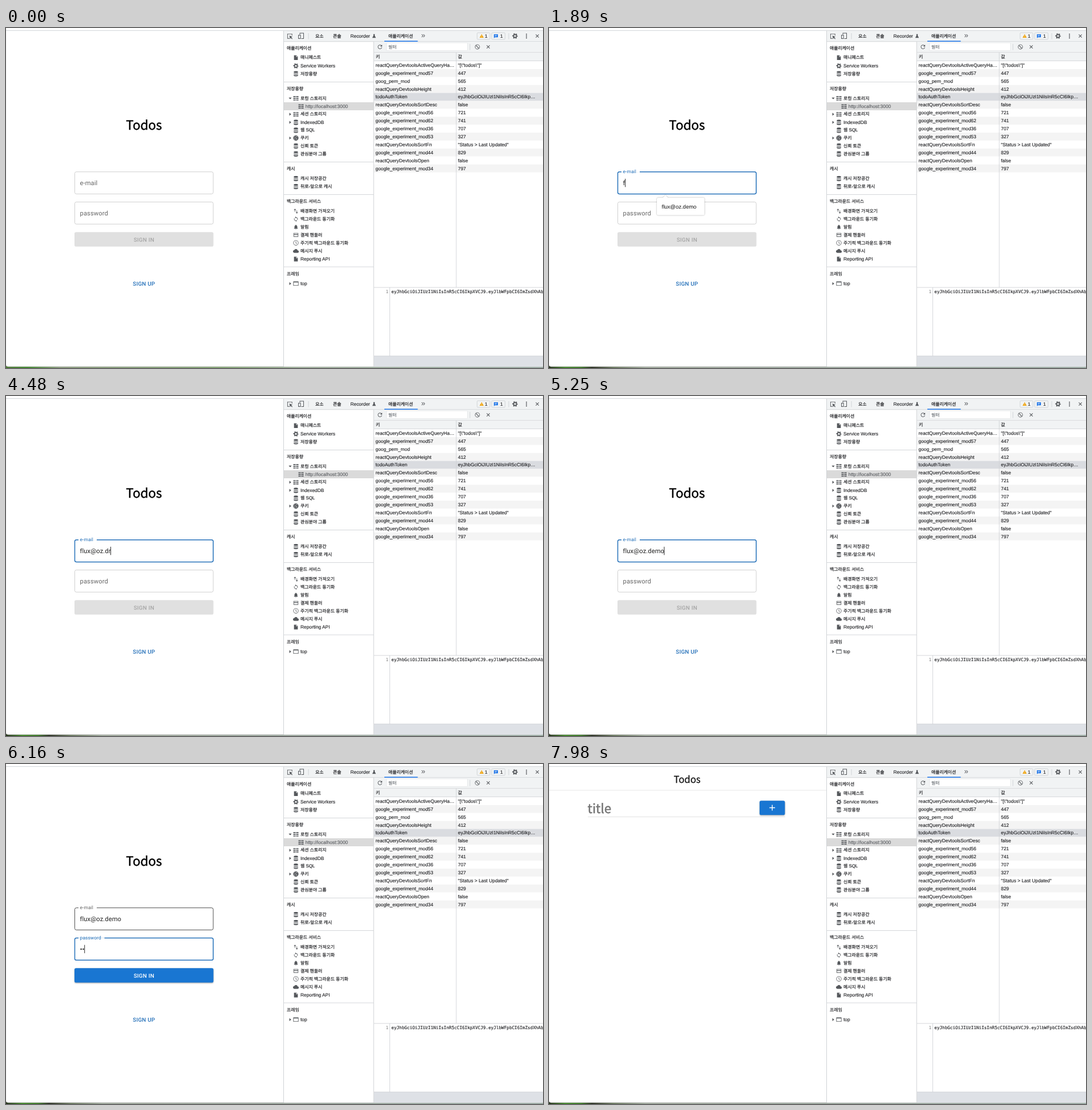
These frames come from a looping animation (941x595 px, 8000 ms). An HTML page:

```html
<!DOCTYPE html>
<html lang="ko">
<head>
<meta charset="utf-8">
<title>Todos</title>
<style>
html, body { margin: 0; width: 100%; height: 100%; overflow: hidden; background: #fff; }
svg { display: block; width: 941px; height: 595px; }
text { font: 8.36px "Liberation Sans", "Noto Sans CJK KR", "Noto Sans CJK JP", sans-serif; fill: #202124;
  text-rendering: geometricPrecision; white-space: pre; }
.panel { stroke-width: .14px; }
.ko { font-size: 7.85px; stroke-width: .2px; }
.noto { font-family: "Noto Sans CJK KR", "Noto Sans CJK JP", "Noto Sans", sans-serif; }
.mono { font: 7.63px "DejaVu Sans Mono", monospace; }
.field { font: 11.14px Roboto, sans-serif; letter-spacing: .1px; }
.button { font: 500 9.74px Roboto, sans-serif; letter-spacing: .28px; }
.mid { text-anchor: middle; }
</style>
</head>
<body>
<svg viewBox="0 0 941 595">
  <defs>
    <linearGradient id="early">
      <stop offset="0" stop-color="#4d7a35"/><stop offset=".04" stop-color="#3f8a2c"/>
      <stop offset=".1" stop-color="#8f9f83"/><stop offset=".4" stop-color="#87a878"/>
      <stop offset=".55" stop-color="#a3b3a0"/><stop offset="1" stop-color="#9fafa8"/>
    </linearGradient>
    <linearGradient id="late">
      <stop offset="0" stop-color="#26331c"/><stop offset=".03" stop-color="#43882b"/>
      <stop offset=".06" stop-color="#3c7a28"/><stop offset=".08" stop-color="#2b3022"/>
      <stop offset=".12" stop-color="#6d7c62"/><stop offset=".18" stop-color="#a3ada0"/>
      <stop offset="1" stop-color="#9fafa8"/>
    </linearGradient>
  </defs>
  <rect id="desk" width="941" height="595"/>
  <rect x="-.3" y="-10" width="941.6" height="602.7" rx="4" fill="#fff" stroke="#aaa" stroke-width=".6"/>
  <g id="page"></g>
  <g id="tools"></g>
</svg>
<script>
const $ = id => document.getElementById(id);
const rect = (x, y, w, h, fill, more = '') =>
  `<rect x="${x}" y="${y}" width="${w}" height="${h}" fill="${fill}" ${more}/>`;
const text = (x, y, s, cls = '', style = '') =>
  `<text x="${x}" y="${y}" class="${cls}" style="${style}">${s}</text>`;
// Small panel label, centred vertically on y
const label = (x, y, s, fill = '#202124') =>
  text(x, y + 2.8, s, /[가-힣]/.test(s) ? 'panel ko' : 'panel', `fill:${fill};stroke:${fill}`);

const shapes = {
  file: 'M6 2h8l6 6v14H4V2zM13 9h5.5L13 3.5z',
  db: 'M3 4c0-4 18-4 18 0v2c0 4-18 4-18 0zM3 9c0 4 18 4 18 0v3c0 4-18 4-18 0zM3 15c0 4 18 4 18 0v5c0 4-18 4-18 0z',
  grid: 'M1 3h10v4H1zM13 3h10v4H13zM1 10h10v4H1zM13 10h10v4H13zM1 17h10v4H1zM13 17h10v4H13z',
  cookie: 'M12 1a11 11 0 100 22 11 11 0 000-22zM7 7h3v3H7zM14 5h3v3h-3zM13 14h4v3h-4zM6 14h3v3H6z',
  swap: 'M8 2 3 7h4v8h2V7h4zM17 17V9h-2v8h-4l5 5 5-5z',
  sync: 'M12 4V1L8 5l4 4V6c3.3 0 6 2.7 6 6 0 1-.25 2-.7 2.8l1.46 1.46A7.9 7.9 0 0020 12c0-4.4-3.6-8-8-8zm0 14c-3.3 0-6-2.7-6-6 0-1 .25-2 .7-2.8L5.24 7.74A7.9 7.9 0 004 12c0 4.4 3.6 8 8 8v3l4-4-4-4z',
  bell: 'M12 22a2 2 0 002-2h-4a2 2 0 002 2zm6-6v-5c0-3-1.6-5.6-4.5-6.3V4a1.5 1.5 0 00-3 0v.7C7.6 5.4 6 7.9 6 11v5l-2 2v1h16v-1z',
  card: 'M2 4h20v16H2zM4 6v3h16V6zM4 12v6h16v-6z',
  clock: 'M12 1a11 11 0 100 22 11 11 0 000-22zm0 2a9 9 0 110 18 9 9 0 010-18zM11 6h2v6l4 2.5-1 1.5-5-3z',
  cloud: 'M19.35 10A7.5 7.5 0 005.35 8 6 6 0 006 20h13a5 5 0 00.35-10z',
  frame: 'M1 3h22v18H1zM3 7v12h18V7z',
  pick: 'M2 2h19v8h-2V4H4v15h7v2H2zM10 9l12 5-5 2 5 5-2 2-5-5-2 5z',
  device: 'M7 1h15v21h-9v-2h7V3H9v4H7zM2 8h9v14H2zM4 10v10h5V10z',
  flask: 'M8 3h8v2h-1v5l6 11H3l6-11V5H8z',
  warn: 'M12 2 1 21h22zM11 9h2v6h-2zM11 17h2v2h-2z',
  note: 'M2 3h20v15H7l-5 4zM6 7h12v2H6zM6 11h9v2H6z',
  reload: 'M17.65 6.35A8 8 0 1019.7 14h-2.1A6 6 0 1116.2 7.8L13 11h7V4z',
  block: 'M12 2a10 10 0 100 20 10 10 0 000-20zm0 2a8 8 0 110 16 8 8 0 010-16zM5 7l2-2 12 12-2 2z',
  close: 'M4 6l2-2 6 6 6-6 2 2-6 6 6 6-2 2-6-6-6 6-2-2 6-6z',
  dots: 'M10 3h4v4h-4zM10 10h4v4h-4zM10 17h4v4h-4z',
  open: 'M3 7h18l-9 11z',
  shut: 'M7 3v18l11-9z'
};
function icon(name, x, y, size = 10, fill = '#55585c') {
  const at = `transform="translate(${x} ${y}) scale(${size / 24}) translate(-12 -12)"`;
  if (name === 'gear') return `<g ${at} fill="none" stroke="${fill}"><circle cx="12" cy="12" r="6" stroke-width="4"/>
    <circle cx="12" cy="12" r="9" stroke-width="4" stroke-dasharray="4.71" stroke-dashoffset="2.3"/></g>`;
  return `<path ${at} fill="${fill}" fill-rule="evenodd" d="${shapes[name]}"/>`;
}

const LINE = '#cacdd1', BAR = '#f1f3f4', BOTTOM = 592.5;
const rule = (x, y, w, h) => rect(x, y, w, h, LINE);

function sidebar() {
  const heads = [['애플리케이션', 35], ['저장용량', 106], ['캐시', 246], ['백그라운드 서비스', 303], ['프레임', 430]];
  const items = [
    ['file', '매니페스트', 51.5], ['gear', 'Service Workers', 66], ['db', '저장용량', 79.7],
    ['grid', '로컬 스토리지', 122.8, 'open'], ['grid', '세션 스토리지', 150.6, 'shut'],
    ['db', 'IndexedDB', 164.8, 'shut'], ['db', '웹 SQL', 178.6], ['cookie', '쿠키', 192.3, 'shut'],
    ['db', '신뢰 토큰', 206.2], ['db', '관심분야 그룹', 220],
    ['db', '캐시 저장공간', 263.2], ['db', '뒤로-앞으로 캐시', 277.2],
    ['swap', '배경화면 가져오기', 320.2], ['sync', '백그라운드 동기화', 334.1], ['bell', '알림', 348],
    ['card', '결제 핸들러', 361.8], ['clock', '주기적 백그라운드 동기화', 375.8],
    ['cloud', '메시지 푸시', 389.8], ['file', 'Reporting API', 404], ['frame', 'top', 447, 'shut']
  ];
  return rect(487, 130, 157, 14, '#dadada') + icon('grid', 517, 137.2) +
    label(524.5, 137, 'http://localhost:3000', '#5a5d61') +
    [94, 234, 291, 417.6].map(y => rule(487, y, 157, .8)).join('') +
    heads.map(([s, y]) => label(492, y, s)).join('') +
    items.map(([pic, s, y, arrow]) => icon(pic, 508, y + .3) + label(516, y, s) +
      (arrow ? icon(arrow, 498, y + .3, 7) : '')).join('');
}

function table() {
  const rows = [
    ['reactQueryDevtoolsActiveQueryHa…', '"[\\"todos\\"]"'], ['google_experiment_mod57', 447],
    ['goog_pem_mod', 565], ['reactQueryDevtoolsHeight', 412],
    ['todoAuthToken', 'eyJhbGciOiJIUzI1NiIsInR5cCI6Ikp…'], ['reactQueryDevtoolsSortDesc', 'false'],
    ['google_experiment_mod56', 721], ['google_experiment_mod62', 741],
    ['google_experiment_mod36', 707], ['google_experiment_mod53', 327],
    ['reactQueryDevtoolsSortFn', '"Status &gt; Last Updated"'], ['google_experiment_mod44', 829],
    ['reactQueryDevtoolsOpen', 'false'], ['google_experiment_mod34', 797]
  ];
  return rect(645, 43, 296, 14.5, BAR) + rule(645, 42.4, 296, .7) + rule(645, 57.2, 296, .7) +
    label(648, 50, '키') + label(792, 50, '값') +
    rows.map(([key, value], i) => {
      const y = 65 + i * 13.9;
      return rect(645, y - 7, 296, 13.9, i === 4 ? '#dadce0' : i % 2 ? '#f4f4f4' : '#fff') +
        label(647.5, y, key) + label(792, y, value);
    }).join('') + rule(788.6, 43, .8, 411);
}

function toolbar() {
  const badge = (x, w) => rect(x, 8.3, w, 11.6, BAR, `rx="1.5" stroke="${LINE}" stroke-width=".8"`);
  return rect(487, 5, 454, 19, BAR) + rule(487, 23.4, 454, .8) +
    icon('pick', 497.5, 14.5, 11) + icon('device', 517, 14, 12) + rule(529.6, 9, .8, 10.5) +
    label(542, 14, '요소') + label(573, 14, '콘솔') + label(603.5, 14, 'Recorder') +
    icon('flask', 645, 14, 8.5) + label(670, 14, '애플리케이션') +
    rect(663, 22.4, 58.5, 1.5, '#1a73e8') + text(727.5, 17.3, '»', '', 'font-size:13px;fill:#55585c') +
    badge(825.5, 22.5) + icon('warn', 833.5, 14, 8, '#f0a30a') + label(839, 14, '1') +
    badge(851, 23.5) + icon('note', 858.5, 14.2, 8.5, '#1a73e8') + label(866, 14, '1') +
    rule(880.6, 9, .8, 10.5) + icon('gear', 892, 14, 10.5) + icon('dots', 912, 14, 11) + icon('close', 931, 14, 9) +
    rect(645, 24.2, 296, 18.3, BAR) + icon('reload', 655.3, 33, 11.5) +
    rect(667, 26, 141.5, 13.5, '#fff', 'stroke="#dfe1e4" stroke-width=".6"') + label(670, 32.8, '필터', '#70757a') +
    rule(812.6, 28, .8, 10.5) + icon('block', 826, 33, 10.5) + icon('close', 845, 33, 9);
}

const token = 'eyJhbGciOiJIUzI1NiIsInR5cCI6IkpXVCJ9.eyJlbWFpbCI6ImZsdXhAb';
$('tools').innerHTML =
  rule(0, 4, 941, .8) + rect(487, 5, 454, BOTTOM - 5, '#fff') + toolbar() + sidebar() + table() +
  rule(645, 453.6, 296, .8) + rule(672, 454, .8, 120) +
  text(670, 464.3, '1', 'mono', 'text-anchor:end;fill:#777') +
  text(675.3, 464.3, token, 'mono panel', 'stroke:#202124') +
  rect(645, 574, 296, BOTTOM - 574, '#dee1e6') + rule(645, 573.6, 296, .8) +
  rule(486, 5, .9, BOTTOM - 5) + rule(643.8, 24, .9, BOTTOM - 24);

const LOOP = 8000, BLUE = '#2470b9';
const EMAIL = 'flux@oz.demo', TYPO = EMAIL.slice(0, 9) + 'r';
const FOCUS = 1540, NEXT = 5390, FILLED = 5810, LEAVE = 6860, HOVER = 7420, ENTER = 7770;
const typing = [[1820, 1], [1960, 2], [2240, 4], [3150, 5], [3640, 6], [3850, 7], [4060, 8],
  [4340, 9], [4900, 9], [5040, 10], [5110, 11], [5180, 12]];
const dotTimes = [5810, 6020, 6230, 6370, 6650, 6860, 7140, 7350];

const pen = document.createElement('canvas').getContext('2d');
pen.font = '11.14px Roboto, sans-serif';
const between = (t, a, b) => t >= a && t < b;
const mix = (a, b, p) => a + (b - a) * p;
const blend = (a, b, p) => `rgb(${a.map((v, i) => Math.round(mix(v, b[i], p)))})`;

// CSS cubic-bezier(x1, 0, .2, 1), solved by bisection
function ease(x, x1) {
  if (x <= 0 || x >= 1) return x <= 0 ? 0 : 1;
  let lo = 0, hi = 1, s;
  for (let i = 0; i < 20; i++) {
    s = (lo + hi) / 2;
    const r = 1 - s;
    if (3 * s * r * r * x1 + .6 * s * s * r + s ** 3 < x) lo = s; else hi = s;
  }
  return s * s * (3 - 2 * s);
}

function field(y, name, gap, raised, focused, hovered) {
  const line = focused ? BLUE : hovered ? '#222' : '#c4c4c4';
  const size = mix(11.14, 8.36, raised);
  return rect(120.5, y, 242.6, 38.7, '#fff', `rx="2.8" stroke="${line}" stroke-width="${focused ? 1.5 : .8}"`) +
    (raised ? rect(127, y - 1, gap * raised, 2.2, '#fff') : '') +
    text(129.6, mix(y + 23.3, y + 2.7, raised), name, 'field', `font-size:${size}px;fill:${focused ? BLUE : '#666'}`);
}
const caret = (x, y) => rect(x, y, .9, 14.5, '#111');
const raisedButton = (x, y, w, h, fill, shade) =>
  rect(x, y, w, h, fill, `rx="2.8" style="filter:drop-shadow(0 1px 1px rgba(0,0,0,${.35 * shade}))"`);

function popup() {
  const shadow = 'style="filter:drop-shadow(0 .7px 1.3px rgba(0,0,0,.35))"';
  return `<g ${shadow}>${rect(189, 297, 83.5, 30.5, '#fff', 'rx="2.5"')}
    <path d="M199 297.5l5-5 5 5z" fill="#fff"/></g>` +
    text(197.5, 315.8, EMAIL, '', 'font-size:9.5px;fill:#111');
}

function signIn(t) {
  const step = typing.filter(([at]) => at <= t).pop();
  const typed = between(t, 4480, 4900) ? TYPO : EMAIL.slice(0, step ? step[1] : 0);
  const dots = dotTimes.filter(at => at <= t).length;
  const onEmail = between(t, FOCUS, NEXT), onPassword = t >= NEXT;
  const on = ease((t - FILLED) / 250, .4), dark = ease((t - HOVER) / 250, .4);
  const fill = dark ? blend([25, 118, 210], [21, 101, 192], dark) : blend([224, 224, 224], [25, 118, 210], on);
  const alpha = mix(.26, 1, on), tone = Math.round(255 * on / alpha);

  let out = text(241.7, 178.4, 'Todos', 'noto mid', 'font-size:22.3px;fill:#000;stroke:#000;stroke-width:.45px') +
    field(251.7, 'e-mail', 32, ease((t - FOCUS) / 200, 0), onEmail, between(t, NEXT, LEAVE)) +
    field(304.5, 'password', 45.5, ease((t - NEXT) / 200, 0), onPassword, false) +
    text(129.6, 275.4, typed, 'field', 'fill:#222') +
    raisedButton(120, 357.3, 243.5, 25.2, fill, on) +
    text(241.8, 373.6, 'SIGN IN', 'button mid', `fill:rgba(${tone},${tone},${tone},${alpha})`) +
    text(241.8, 451.1, 'SIGN UP', 'button mid', `fill:${BLUE}`);
  for (let i = 0; i < dots; i++) out += `<circle cx="${131.6 + i * 3.85}" cy="324" r="1.25" fill="#222"/>`;
  if (onEmail && !between(t, 2800, 3150))
    out += caret(129.3 + pen.measureText(typed).width + typed.length * .1, 263.8);
  if (onPassword) out += caret(129.6 + dots * 3.85, 316.6);
  if (between(t, 1890, 4480) || between(t, 4900, 5180)) out += popup();
  return out;
}

function todoList() {
  return text(242, 33, 'Todos', 'noto mid', 'font-size:16.7px;fill:#111;stroke:#111;stroke-width:.25px') +
    rect(0, 45.6, 486, .8, '#e0e0e0') +
    text(67.5, 86, 'title', 'noto', 'font-size:22.3px;fill:#757575;stroke:#757575;stroke-width:.5px') +
    rect(68, 92, 346, .8, '#dcdcdc') + raisedButton(369, 64.2, 44.4, 25, '#1976d2', 1) +
    '<path d="M386.3 76.5h9.8M391.2 71.6v9.8" stroke="#fff" stroke-width="1.4"/>';
}

function draw(now) {
  const t = now % LOOP;
  $('desk').setAttribute('fill', t < 980 ? 'url(#early)' : 'url(#late)');
  $('page').innerHTML = t < ENTER ? signIn(t) : todoList();
  requestAnimationFrame(draw);
}
requestAnimationFrame(draw);
</script>
</body>
</html>
```
